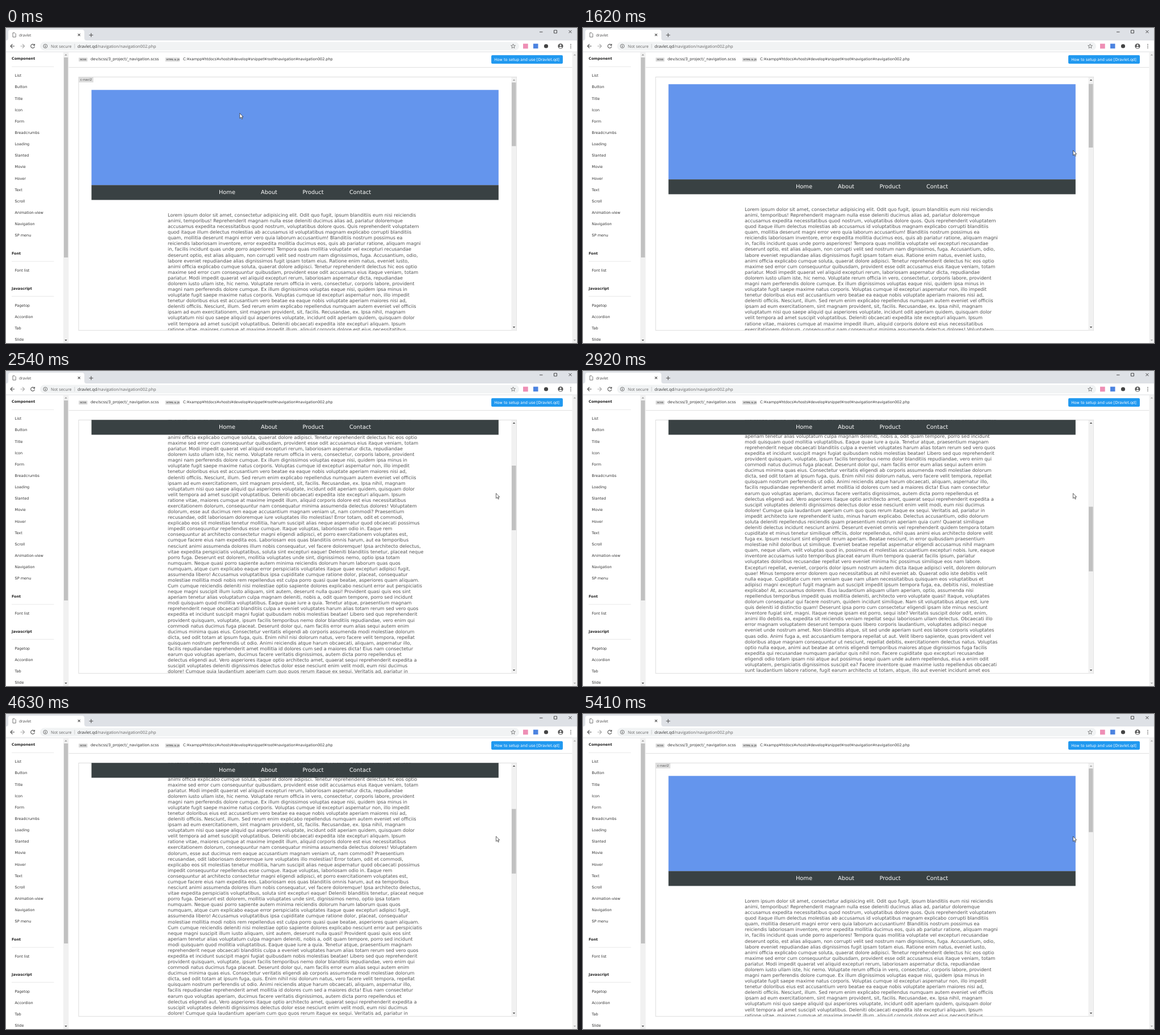
Animation, 1006 px wide and 556 px high, one loop 7.37 s. Source, as an HTML page:

```html
<!DOCTYPE html>
<html lang="en">
<head>
<meta charset="utf-8">
<title>Sticky navigation</title>
<style>
html, body { margin: 0; width: 100%; height: 100%; overflow: hidden; background: #fff; }
svg { display: block; width: 100%; height: 100%; }
text { font-family: "DejaVu Sans", sans-serif; text-rendering: geometricPrecision; white-space: pre; }
.chrome { font-family: "Open Sans", sans-serif; }
.line { fill: none; stroke: #555; stroke-width: 1.1; }
</style>
</head>
<body>
<svg viewBox="0 0 1006 556">
  <defs><clipPath id="view"><rect x="128" y="86" width="762.5" height="447.5"/></clipPath></defs>
  <g id="browser"></g>
  <g id="page"></g>
  <rect x="128" y="86.5" width="771.5" height="447.3" fill="none" stroke="#dcdcdc"/>
  <g clip-path="url(#view)">
    <g id="content"></g>
    <g id="nav"></g>
  </g>
  <g id="scrollbar"></g>
  <path id="cursor" d="M0 0V9L2.1 7.1L3.6 10.3L5 9.7L3.5 6.5H6.2Z" fill="#fff" stroke="#222" stroke-width=".7"/>
</svg>
<script>
const LOREM = `Lorem ipsum dolor sit amet, consectetur adipisicing elit. Odit quo fugit, ipsum blanditiis eum nisi reiciendis
animi, temporibus! Reprehenderit magnam nulla esse deleniti ducimus alias ad, pariatur doloremque
accusamus expedita necessitatibus quod nostrum, voluptatibus dolore quos. Quis reprehenderit voluptatem
quod itaque illum delectus molestias ab accusamus id voluptatibus magnam explicabo corrupti blanditiis
quam, mollitia deserunt magni error vero quia laborum accusantium! Blanditiis nostrum possimus ea
reiciendis laboriosam inventore, error expedita mollitia ducimus eos, quis ab pariatur ratione, aliquam magni
in, facilis incidunt quas unde porro asperiores! Tempora quas mollitia voluptate vel excepturi recusandae
deserunt optio, est alias aliquam, non corrupti velit sed nostrum nam dignissimos, fuga. Accusantium, odio,
labore eveniet repudiandae alias dignissimos fugit ipsam totam eius. Ratione enim natus, eveniet iusto,
animi officia explicabo cumque soluta, quaerat dolore adipisci. Tenetur reprehenderit delectus hic eos optio
maxime sed error cum consequuntur quibusdam, provident esse odit accusamus eius itaque veniam, totam
pariatur. Modi impedit quaerat vel aliquid excepturi rerum, laboriosam aspernatur dicta, repudiandae
dolorem iusto ullam iste, hic nemo. Voluptate rerum officia in vero, consectetur, corporis labore, provident
magni nam perferendis dolore cumque. Ex illum dignissimos voluptas eaque nisi, quidem ipsa minus in
voluptate fugit saepe maxime natus corporis. Voluptas cumque id excepturi aspernatur non, illo impedit
tenetur doloribus eius est accusantium vero beatae ea eaque nobis voluptate aperiam maiores nisi ad,
deleniti officiis. Nesciunt, illum. Sed rerum enim explicabo repellendus numquam autem eveniet vel officiis
ipsam ad eum exercitationem, sint magnam provident, sit, facilis. Recusandae, ex. Ipsa nihil, magnam
voluptatum nisi quo saepe aliquid qui asperiores voluptate, incidunt odit aperiam quidem, quisquam dolor
velit tempora ad amet suscipit voluptatibus. Deleniti obcaecati expedita iste excepturi aliquam. Ipsum
ratione vitae, maiores cumque at maxime impedit illum, aliquid corporis dolore est eius necessitatibus
exercitationem dolorum, consequuntur nam consequatur minima assumenda delectus dolores! Voluptatem
dolorum, esse aut ducimus rem eaque accusantium magnam veniam ut, nam commodi? Praesentium
recusandae, odit laboriosam doloremque iure voluptates illo molestias! Error totam, odit et commodi,
explicabo eos sit molestias tenetur mollitia, harum suscipit alias neque aspernatur quod obcaecati possimus
impedit consequuntur repellendus esse cumque. Itaque voluptas, laboriosam odio in. Eaque rem
consequuntur at architecto consectetur magni eligendi adipisci, et porro exercitationem voluptates est,
cumque facere eius nam expedita eos. Laboriosam eos quas blanditiis omnis harum, aut ea temporibus
nesciunt animi assumenda dolores illum nobis consequatur, vel facere doloremque! Ipsa architecto delectus,
vitae expedita perspiciatis voluptatibus, soluta sint excepturi eaque! Deleniti blanditiis tenetur, placeat neque
porro fuga. Deserunt est dolorem, mollitia voluptates unde sint, dignissimos nemo, optio ipsa totam
numquam. Neque quasi porro sapiente autem minima reiciendis dolorum harum laborum quas quos
numquam, atque cum explicabo eaque error perspiciatis voluptates itaque quae excepturi adipisci fugit,
assumenda libero! Accusamus voluptatibus ipsa cupiditate cumque ratione dolor, placeat, consequatur
molestiae mollitia modi nobis rem repellendus est culpa porro quasi quae beatae, asperiores quam aliquam.
Cum cumque reiciendis deleniti nisi molestiae optio sapiente dolores explicabo nesciunt error aut perspiciatis
neque magni suscipit illum iusto aliquam, sint autem, deserunt nulla quasi! Provident quasi quis eos sint
aperiam tenetur alias voluptatum culpa magnam deleniti, nobis a, odit quam tempore, porro sed incidunt
modi quisquam quod mollitia voluptatibus. Eaque quae iure a quia. Tenetur atque, praesentium magnam
reprehenderit neque obcaecati blanditiis culpa a eveniet voluptates harum alias totam rerum sed vero quos
expedita et incidunt suscipit magni fugiat quibusdam nobis molestias beatae! Libero sed quo reprehenderit
provident quisquam, voluptate, ipsum facilis temporibus nemo dolor blanditiis repudiandae, vero enim qui
commodi natus ducimus fuga placeat. Deserunt dolor qui, nam facilis error eum alias sequi autem enim
ducimus minima quas eius. Consectetur veritatis eligendi ab corporis assumenda modi molestiae dolorum
dicta, sed odit totam at ipsum fuga, quis. Enim nihil nisi dolorum natus, vero facere velit tempora, repellat
quisquam nostrum perferendis ut odio. Animi reiciendis atque harum obcaecati, aliquam, aspernatur illo,
facilis repudiandae reprehenderit amet mollitia id dolores cum sed a maiores dicta! Eius nam consectetur
earum quo voluptas aperiam, ducimus facere veritatis dignissimos, autem dicta porro repellendus et
delectus eligendi aut. Vero asperiores itaque optio architecto amet, quaerat sequi reprehenderit expedita a
suscipit voluptates deleniti dignissimos delectus dolor esse nesciunt enim velit modi, eum nisi ducimus
dolore! Cumque quia laudantium aperiam cum quo quos rerum itaque ex sequi. Veritatis ad, pariatur in
impedit architecto iure reprehenderit iusto, minus harum explicabo. Delectus accusantium, odio dolorum
soluta deleniti repellendus reiciendis quam praesentium nostrum aperiam quia cum! Quaerat similique
deleniti delectus incidunt nesciunt animi. Deserunt eveniet omnis vel reprehenderit quidem tempora totam
cupiditate et minus tenetur similique officiis, dolor repellendus, nihil quas animi eius architecto dolore velit
fuga ex. Ipsum nesciunt sint eligendi rerum aperiam. Beatae nesciunt, in error quibusdam praesentium
molestiae nihil doloribus ut similique. Eveniet beatae repellat aspernatur eligendi accusamus nihil magnam
quam, neque ullam, velit voluptas quod in, possimus et molestias accusantium excepturi nobis. Iure, eaque
inventore accusamus iusto temporibus placeat earum illum tempora quaerat facilis ipsum, pariatur
voluptates doloribus recusandae repellat vero eveniet minima hic possimus similique eos nam labore.
Excepturi repellat, eveniet, corporis dolor ipsum nostrum autem dicta itaque adipisci velit, dolorem dolorum
quae! Minus tempore error dolorem quo necessitatibus at nihil eveniet ab. Quaerat odio iste debitis velit
nulla eaque. Cupiditate cum rem veniam quae nam ullam necessitatibus quisquam eos voluptatibus et
adipisci magni excepturi fugit magnam aut suscipit impedit ipsum tempora fuga, ea, debitis nisi, molestiae
explicabo! At, accusamus dolorem. Eius laudantium aliquam ullam aperiam, optio, assumenda nisi
repellendus temporibus impedit quas mollitia deleniti, architecto vero voluptate quasi! Itaque, voluptates
dolorum consequatur qui facere nostrum, quidem incidunt similique. Nam sit voluptatibus atque est, iure
quis deleniti id distinctio quam! Deserunt ipsa porro cum consectetur eligendi ipsam iste minus nesciunt
inventore fugiat sint, magni. Itaque neque ipsam est porro, sequi iste? Veritatis suscipit dolor odit, enim,
animi illo debitis ea, expedita sit reiciendis veniam repellat sequi laboriosam ullam delectus. Obcaecati illo
error magnam voluptatem deserunt tempora quos libero corporis laudantium, voluptates adipisci neque
eveniet unde nostrum amet. Non blanditiis atque, sit sed unde aperiam sunt eos labore corporis voluptates
quas odio. Animi fuga a, est accusantium tempora repellat ut aut. Velit libero sapiente, quas provident vel
doloribus atque magnam consequuntur ut nesciunt, repellat debitis, exercitationem delectus natus. Voluptas
optio nulla eaque, animi aut beatae at omnis eligendi temporibus maiores atque dignissimos fuga facilis
expedita qui recusandae numquam pariatur quis nihil non. Facere cupiditate quo excepturi recusandae
eligendi odio totam ipsam nisi atque aut possimus sequi quam unde autem repellendus, eius a enim odit
voluptatem, perspiciatis dignissimos suscipit ea? Facere inventore quae maxime iusto repellendus obcaecati
sunt laudantium labore ratione, fugit earum architecto ut totam, atque, illo aut eveniet incidunt amet eos
doloribus enim error iure tempora blanditiis. Expedita laborum et, consequatur temporibus minima rem
suscipit quae, voluptatum, consectetur ad veritatis sit! Ducimus ipsum aut nam doloribus natus, commodi
laborum reiciendis deleniti quae aperiam corporis cum at autem esse voluptas eum cumque et sit totam
consequatur ex tempora mollitia quas in? Amet sapiente, reiciendis qui, ducimus vitae labore necessitatibus
dolor cumque itaque, quam nobis adipisci ex vero non deserunt aliquam nisi placeat numquam. Voluptate
consectetur quam, nesciunt dolorum provident enim dolorem nisi dignissimos maiores debitis distinctio,
ullam repudiandae earum? Cum dolore, deserunt quia, placeat provident, nobis vero corporis ad laboriosam
in nam. Recusandae libero sed neque dolorem ipsam voluptatibus quisquam magni voluptatem iste
reprehenderit doloremque, sit in dolor facere ad quia, aliquam rem quidem eligendi. Explicabo unde, tenetur
enim nulla totam cupiditate. Esse voluptate saepe rerum asperiores, totam quas laborum incidunt optio,
animi odio nisi, quo quos. Qui voluptatum dolor sint unde, reprehenderit dolore quis debitis, perferendis ea,
eius est suscipit beatae provident nulla. Quas recusandae excepturi commodi, reprehenderit facilis quia nam,
odio eveniet dolor magni tenetur iusto culpa fugiat suscipit dolore ducimus libero! Soluta assumenda vero
earum repudiandae enim beatae, rem recusandae, voluptatibus itaque consectetur. Maxime, eaque
doloremque excepturi, deleniti voluptate in natus. Quasi dolore corrupti eius minus eaque ex modi quo, fuga
provident ducimus magni, illum, doloremque sunt sit tempora. Facilis animi necessitatibus quam voluptatum
repellat nobis, quidem eaque dolorum minus sapiente. Harum tenetur officia sequi, velit ratione autem`;

const LOOP = 7370, NAV_TOP = 277.3, NAV_HEIGHT = 26.2, VIEW_TOP = 86.3;
const $ = id => document.getElementById(id);
const rect = (x, y, w, h, fill, rx = 0) =>
  `<rect x="${x}" y="${y}" width="${w}" height="${h}" fill="${fill}" rx="${rx}"/>`;
const text = (x, y, size, str, fill = '#333', extra = '') =>
  `<text x="${x}" y="${y}" font-size="${size}" fill="${fill}" ${extra}>${str}</text>`;
const path = (d, extra = '') => `<path class="line" d="${d}" ${extra}/>`;
const arrow = (x, y, dir, fill = '#505050') =>
  `<path d="M${x - 2.2} ${y + dir}h4.4l-2.2 ${-2.4 * dir}z" fill="${fill}"/>`;
const chromeText = (x, y, size, str, fill) => text(x, y, size, str, fill, 'class="chrome"');

$('browser').innerHTML =
  rect(0, 0, 1006, 22, '#dee1e6') +
  '<path d="M0 22Q4 22 4 18V7Q4 3 8 3H134Q138 3 138 7V18Q138 22 142 22Z" fill="#fff"/>' +
  path('M12 8.5h3.2l2 2v5.5h-5.2z', 'style="stroke-width:.8"') +
  chromeText(23, 14.8, 6.6, 'dravlet', '#444') +
  path('M126.7 10.2l4 4m0-4l-4 4M150 9v7m-3.5-3.5h7') +
  path('M940 7h5.5M965.5 4h5v5h-5zM991.5 4l5 5m0-5l-5 5', 'style="stroke:#222;stroke-width:.8"') +
  rect(60, 24.5, 844, 15, '#f1f3f4', 7.5) +
  path('M15 32H8m3.4-3.5L7.9 32l3.5 3.5') +
  path('M25.5 32h7m-3.4-3.5l3.5 3.5-3.5 3.5', 'style="stroke:#aaa"') +
  path('M49.6 29.7A3.4 3.4 0 1 0 50.4 32.7M50.5 28v2.7h-2.7') +
  '<circle class="line" cx="69.3" cy="32" r="3.4" style="stroke-width:.8"/>' + path('M69.3 31.5v2.4m0-4v.9') +
  chromeText(79, 34.6, 7.25, 'Not secure', '#666') + rect(120.6, 28, .6, 8, '#bbb') +
  chromeText(126, 34.6, 7.3, 'dravlet.qd<tspan fill="#666">/navigation/navigation002.php</tspan>', '#333') +
  path('M893.5 28.2l1.1 2.6 2.8.2-2.2 1.8.7 2.8-2.4-1.5-2.4 1.5.7-2.8-2.2-1.8 2.8-.2z', 'style="stroke-width:.7"') +
  rect(911, 27.7, 8.7, 8.7, '#ee8fb5') + rect(929, 27.7, 8.5, 8.5, '#4c83e0') +
  '<circle cx="951.5" cy="32" r="3.6" fill="#444"/><circle cx="977" cy="32" r="4.6" fill="#555"/>' +
  '<circle cx="977" cy="30.6" r="1.5" fill="#fff"/><path d="M974 34.4q3-2.6 6 0q-3 2.4-6 0" fill="#fff"/>' +
  [29, 32, 35].map(y => `<circle cx="995" cy="${y}" r=".85" fill="#555"/>`).join('') +
  rect(0, 41.6, 1006, .9, '#d8dadd');

const menu = (title, y, items) =>
  text(10, y, 6.4, title, '#222', 'font-weight="bold"') + rect(10, y + 11.4, 74.5, .8, '#e3e3e3') +
  items.map((s, i) => text(15.6, y + 29.9 + i * 20.14, 6.5, s)).join('');

$('page').innerHTML =
  menu('Component', 56.4, ['List', 'Button', 'Title', 'Icon', 'Form', 'Breadcrumbs', 'Loading', 'Slanted', 'Movie',
    'Hover', 'Text', 'Scroll', 'Animation-view', 'Navigation', 'SP menu']) +
  menu('Font', 400.2, ['Font list']) +
  menu('Javascript', 461.9, ['Pagetop', 'Accordion', 'Tab', 'Slide']) +
  rect(101, 42.5, 9.4, 514, '#f1f1f1') + rect(102, 52, 7.3, 353, '#c1c1c1') +
  arrow(105.5, 47.5, 1, '#999') + arrow(105.5, 551, -1) +
  rect(997.5, 42.5, 8.5, 514, '#f1f1f1') + arrow(1002, 47.5, 1, '#aaa') + arrow(1002, 551, -1, '#aaa') +
  rect(110.4, 69, 887, .9, '#dedede') +
  rect(128, 52.2, 15.5, 7, '#dcdcdc', 1) + text(130.2, 57.3, 4, 'SCSS', '#666', 'font-weight="bold"') +
  text(149, 56.7, 6.77, 'dev/scss/3_project/_navigation.scss') +
  rect(280.6, 52.2, 25.5, 7, '#dcdcdc', 1) + text(282.6, 57.3, 4, 'HTML &amp; JS', '#666', 'font-weight="bold"') +
  text(312, 56.7, 6.5, 'C:¥xampp¥htdocs¥vhosts¥develop¥snippet¥root¥navigation¥navigation002.php') +
  rect(855, 48, 126, 15, '#2199f0', 2) +
  text(860.3, 58.2, 6.65, 'How to setup and use [Dravlet.qd]', '#fff');

$('content').innerHTML =
  rect(128, 86.5, 26, 9.5, '#dedede') + text(130.8, 93.2, 5.6, 'c-navi2', '#555') +
  rect(150.6, 109.3, 717.2, 168.2, '#6495ed') +
  '<g id="lorem">' + LOREM.split('\n').map((s, i) => text(285, 333 + i * 10.08, 8.16, s, '#505050')).join('') + '</g>';

$('nav').innerHTML = rect(150.6, 0, 717.2, NAV_HEIGHT, '#394143') +
  [[375, 'Home'], [449, 'About'], [522.5, 'Product'], [605, 'Contact']]
    .map(([x, s]) => text(x, 15.9, 9.8, s, '#fff')).join('');

$('scrollbar').innerHTML = rect(890.4, 87, 9, 446.5, '#f1f1f1') +
  '<rect id="thumb" x="891" width="7.5" fill="#c1c1c1"/>' +
  '<g id="up">' + arrow(895, 92, 1, 'currentColor') + '</g>' + arrow(895, 528, -1);

// In-out easing; a higher power gives softer ends.
const ease = (x, power) => x < .5 ? .5 * (2 * x) ** power : 1 - .5 * (2 - 2 * x) ** power;

// Progress of a move whose changes land on evenly spaced moments (to 10 ms) from start to end.
function stepped(t, start, end, steps, power) {
  if (t < start) return 0;
  const k = Math.floor((t - start + 5) / (end - start) * (steps - 1));
  return ease(Math.min(1, (k + 1) / steps), power);
}

// start, end, steps, distance, easing power
const WHEEL = [
  [1620, 2010, 6, 168, 1.93], [2150, 2390, 4, 56, 2], [2540, 3150, 9, 504, 1.03],
  [4010, 4250, 4, -224, 5], [4480, 4630, 3, -224, 2], [4790, 5020, 4, -168, 2], [5170, 5410, 4, -112, 2]
];

function render(t) {
  const scroll = WHEEL.reduce((sum, [start, end, steps, dist, power]) =>
    sum + dist * stepped(t, start, end, steps, power), 0);
  const fixed = scroll > NAV_TOP - VIEW_TOP;
  const lost = fixed ? NAV_HEIGHT : 0;   // a fixed bar leaves the flow, so the text moves up
  $('content').setAttribute('transform', `translate(0 ${-scroll})`);
  $('lorem').setAttribute('transform', `translate(0 ${-lost})`);
  $('nav').setAttribute('transform', `translate(0 ${fixed ? VIEW_TOP : NAV_TOP - scroll})`);
  const ratio = 428 / (1704 - lost);
  $('thumb').setAttribute('y', 96.2 + scroll * ratio);
  $('thumb').setAttribute('height', 447 * ratio);
  $('up').setAttribute('color', scroll > .5 ? '#505050' : '#a3a3a3');

  const p = stepped(t, 760, 1450, 10, 2), q = 1 - p;
  const curve = (a, b, c) => a * q * q + 2 * b * p * q + c * p * p;
  $('cursor').setAttribute('transform', `translate(${curve(411.8, 660, 863.4)} ${curve(150.4, 287, 215.9)})`);
}

const began = performance.now();
function tick() {
  render((performance.now() - began) % LOOP);
  requestAnimationFrame(tick);
}
tick();
</script>
</body>
</html>
```
